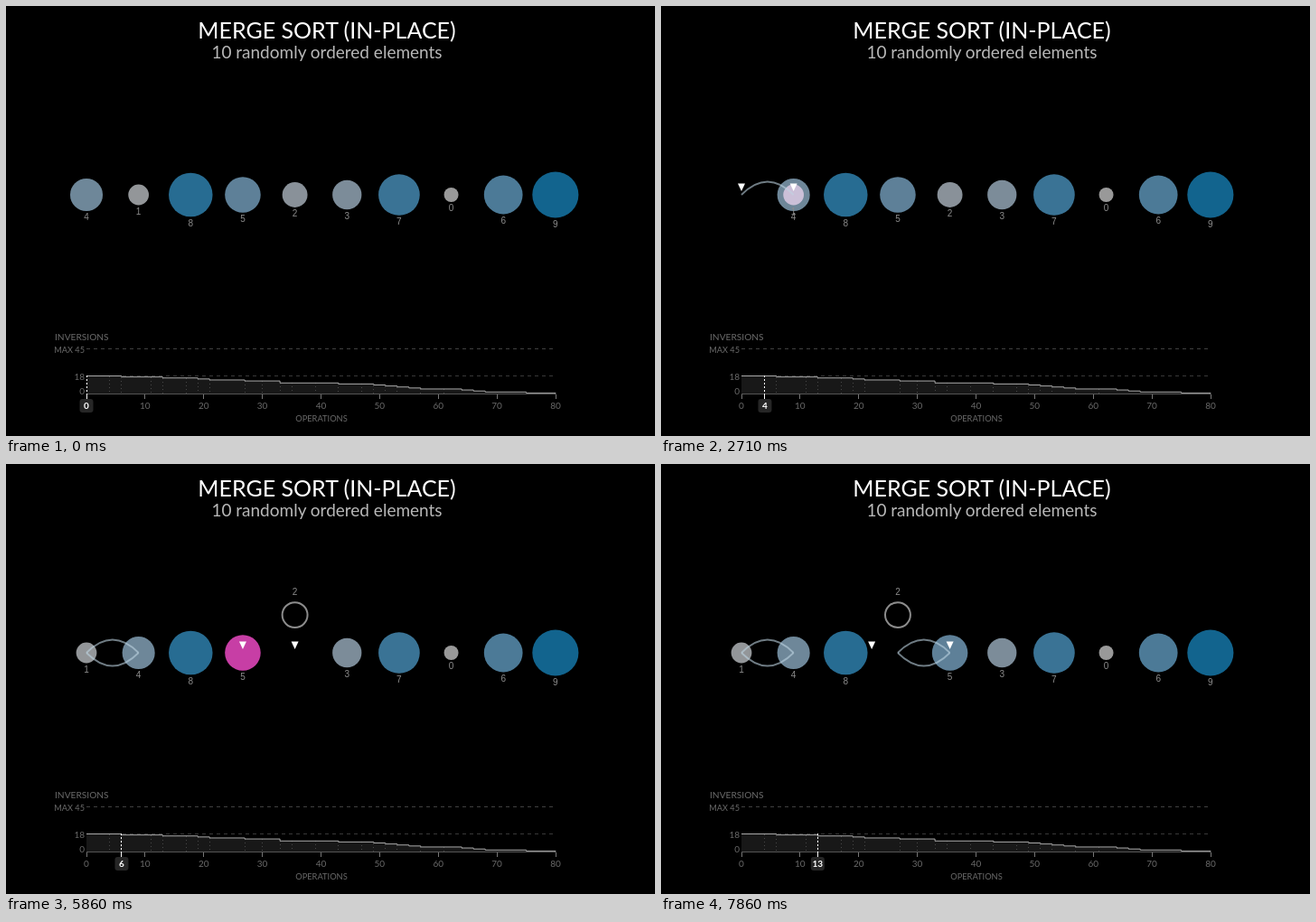
These frames come from a looping animation (718 by 476 pixels, 8 s). An HTML page:

```html
<!DOCTYPE html>
<html lang="en">
<head>
<meta charset="utf-8">
<title>Merge sort</title>
<style>
  html, body { margin: 0; width: 100%; height: 100%; overflow: hidden; background: #000; }
  svg { display: block; width: 718px; height: 476px; }
  line { shape-rendering: crispEdges; }
  text { font-family: Lato, "Open Sans", sans-serif; text-anchor: middle; }
  .title { font-size: 25px; fill: #fff; }
  .subtitle { font-size: 19px; fill: #b8b8b8; }
  .axis { font-size: 10px; fill: #6a6a6a; }
  .num { font: 10px "Liberation Sans", Arial, sans-serif; fill: #8c8c8c; }
  .ball { mix-blend-mode: screen; }
</style>
</head>
<body>
<svg id="stage" viewBox="0 0 718 476"></svg>
<script>
const stage = document.getElementById('stage');
const LOOP = 8000, TICK = 1000 / 7;
const ROW = 209, BASE = 429.5;
const VALUES = [4, 1, 8, 5, 2, 3, 7, 0, 6, 9];
const PINK = [199, 62, 165];

const slot = i => 89 + 57.65 * i;
const opX = n => 89 + 6.4875 * n;
const invY = n => BASE - n * 1.11;
const radius = v => Math.sqrt(64 + 65.5 * v);
const tint = v => [153 - 135 * (v / 9) ** 1.4, 153 - 53 * (v / 9) ** 1.3, 153 - 11 * (v / 9) ** 4];
const ramp = (k, a, b) => Math.max(0, Math.min(1, (k - a) / (b - a)));
const cubicIn = t => t ** 3;
const expInOut = t => t <= 0 ? 0 : t >= 1 ? 1
  : t < .5 ? 2 ** (20 * t - 10) / 2 : 1 - 2 ** (10 - 20 * t) / 2;
const mix = (a, b, t) => a + (b - a) * t;
const rgb = c => `rgb(${c.map(Math.round)})`;

function set(el, attrs) {
  for (const name in attrs) el.setAttribute(name, attrs[name]);
  return el;
}
function add(tag, attrs, label, parent = stage) {
  const el = set(document.createElementNS('http://www.w3.org/2000/svg', tag), attrs);
  if (label !== undefined) el.textContent = label;
  return parent.appendChild(el);
}
const line = (x1, y1, x2, y2, stroke, dash = 'none') =>
  add('line', { x1, y1, x2, y2, stroke, 'stroke-dasharray': dash });
const axisText = (x, y, label, size = 10, anchor = 'middle') =>
  add('text', { class: 'axis', x, y, style: `font-size:${size}px;text-anchor:${anchor}` }, label);

function drawChart() {
  const steps = [[0, 18], [6, 17], [13, 16], [19, 15], [21, 14], [27, 13], [33, 11], [43, 10],
    [49, 9], [51, 8], [53, 7], [55, 6], [57, 5], [64, 4], [66, 3], [68, 2], [75, 1], [80, 0]];
  let path = `M${opX(0)} ${invY(18)}`;
  for (const [n, inv] of steps) path += `H${opX(n)}V${invY(inv)}`;
  add('path', { d: path + `V${BASE}H${opX(0)}Z`, fill: '#181818' });
  for (const n of [4, 6, 11, 13, 17, 19, 21, 27, 30, 33, 35, 39, 43, 47, 49, 51, 53, 57, 61, 64])
    line(opX(n), invY(steps.filter(s => s[0] <= n).pop()[1]), opX(n), BASE, '#484848', '1 3');
  line(89, 379.5, 608, 379.5, '#404040', '4 4');
  line(89, 409.5, 608, 409.5, '#383838', '4 4');
  line(89, BASE, 608, BASE, '#555');
  add('path', { d: path, fill: 'none', stroke: '#aaa' });
  axisText(54, 370, 'INVERSIONS', 10.2, 'start');
  axisText(87, 384, 'MAX 45', 9.2, 'end');
  axisText(87, 414, '18', 10, 'end');
  axisText(87, 430, '0', 10, 'end');
  axisText(349, 460, 'OPERATIONS', 9.3);
  for (let n = 0; n <= 80; n += 10) {
    line(opX(n), 430, opX(n), 435, '#777');
    axisText(opX(n), 446, n);
  }
}

add('text', { class: 'title', x: 355, y: 36 }, 'MERGE SORT (IN-PLACE)');
add('text', { class: 'subtitle', x: 355, y: 58 }, '10 randomly ordered elements');
drawChart();

const cursor = add('g', {});
add('line', { y1: 409, y2: 430, stroke: '#fff', 'stroke-dasharray': '2 2' }, undefined, cursor);
add('line', { y1: 430, y2: 435, stroke: '#fff' }, undefined, cursor);
add('rect', { x: -7.5, y: 435, width: 15, height: 15, rx: 3, fill: '#262626' }, undefined, cursor);
const cursorText = add('text', { y: 446, fill: '#fff', 'font-size': 10, 'font-weight': 700 }, '0', cursor);

const balls = [];
VALUES.forEach((v, i) => {
  balls[v] = {
    v, home: i, r: radius(v),
    disc: add('circle', { class: 'ball', r: radius(v) }),
    ring: add('circle', { r: radius(v), fill: 'none', stroke: '#8c8c8c', 'stroke-width': 2 }),
    label: add('text', { class: 'num' }, v)
  };
});

const arc = () => add('path', {
  fill: 'none', stroke: '#c0d6e4', 'stroke-opacity': .58, 'stroke-width': 1.8
});
const pointer = () => add('path', { d: 'M-4 196.5H4L0 205Z', fill: '#fff' });

// All times below are in ticks.
const MOVES = [
  { v: 4, from: 0, to: 1, start: 13, end: 17, side: -1, arc: arc() },
  { v: 1, from: 1, to: 0, start: 21, end: 25, side: 1, arc: arc() },
  { v: 5, from: 3, to: 4, start: 41, end: 45, side: -1, arc: arc() },
  { v: 2, from: 4, to: 3, start: 49, end: 53, side: 1, arc: arc() }
];
const LIFTS = [
  { v: 1, start: 0, full: 4, drop: 17 },
  { v: 2, start: 24, full: 28, drop: 45 },
  { v: 2, start: 52.6, full: 55, drop: Infinity }
];
// By value: fade to pink over the first pair, back over the second.
const GLOWS = { 4: [9, 13, 17, 18], 1: [18, 21, 24.5, 29], 5: [38, 41, 44, 45], 2: [46, 49, 53, 54] };
const HOPS = [
  { from: [8, 9], to: [0, 1], start: 5.35, show: [3, 5], hide: [25, 28] },
  { from: [2, 2], to: [3, 4], start: 34.8, show: [31, 34], hide: [48, 49] },
  { from: [3, 5], to: [2, 3], start: 53, show: [52, 53], hide: [98, 99] }
];
const CURSORS = [[0, 0], [17, 4], [25, 6], [45, 11], [53, 13]];
const pointers = [pointer(), pointer()];

function glowOf(v, k) {
  if (!GLOWS[v]) return 0;
  const [a, b, c, d] = GLOWS[v];
  return ramp(k, a, b) * (1 - ramp(k, c, d));
}

function drawBall(ball, k) {
  let x = slot(ball.home), y = ROW;
  const move = MOVES.find(m => m.v === ball.v);
  if (move) {
    const p = cubicIn(ramp(k, move.start, move.end));
    x = mix(slot(move.from), slot(move.to), p);
    y = ROW + move.side * 58 * p * (1 - p);
  }
  const hold = LIFTS.find(l => l.v === ball.v && k > l.start && k < l.drop);
  const lift = hold ? ramp(k, hold.start, hold.full) : 0;
  const glow = glowOf(ball.v, k);
  const color = tint(ball.v).map((n, i) => mix(n, PINK[i], glow));
  const top = ROW - 3 * ball.r;
  set(ball.disc, { cx: x, cy: y, fill: rgb(color), opacity: 1 - lift });
  set(ball.ring, { cx: x, cy: top, opacity: lift });
  set(ball.label, { x, y: lift ? top - ball.r - 8 : y + ball.r + 10.4 });
}

function drawArc(move, k) {
  const p = cubicIn(ramp(k, move.start, move.end));
  const x0 = slot(move.from), x1 = slot(move.to), bend = 29 * move.side;
  // The leading part of the quadratic curve, up to the moving disc.
  const d = `M${x0} ${ROW}Q${mix(x0, x1, p / 2)} ${ROW + bend * p} ` +
    `${mix(x0, x1, p)} ${ROW + 2 * bend * p * (1 - p)}`;
  set(move.arc, { d, opacity: p > 0 ? 1 : 0 });
}

function drawPointers(k) {
  const hop = HOPS.filter(h => k >= h.show[0]).pop() || HOPS[0];
  const p = expInOut(ramp(k, hop.start, hop.start + 4));
  const opacity = ramp(k, ...hop.show) * (1 - ramp(k, ...hop.hide));
  pointers.forEach((el, i) => {
    const x = mix(slot(hop.from[i]), slot(hop.to[i]), p);
    set(el, { transform: `translate(${x} 0)`, opacity });
  });
}

function render(ms) {
  const k = Math.floor((ms + 6) / TICK);
  balls.forEach(ball => drawBall(ball, k));
  MOVES.forEach(move => drawArc(move, k));
  drawPointers(k);
  const op = CURSORS.filter(c => k >= c[0]).pop()[1];
  set(cursor, { transform: `translate(${opX(op)} 0)` });
  cursorText.textContent = op;
}

const began = performance.now();
function frame() {
  render((performance.now() - began) % LOOP);
  requestAnimationFrame(frame);
}
frame();
</script>
</body>
</html>
```
